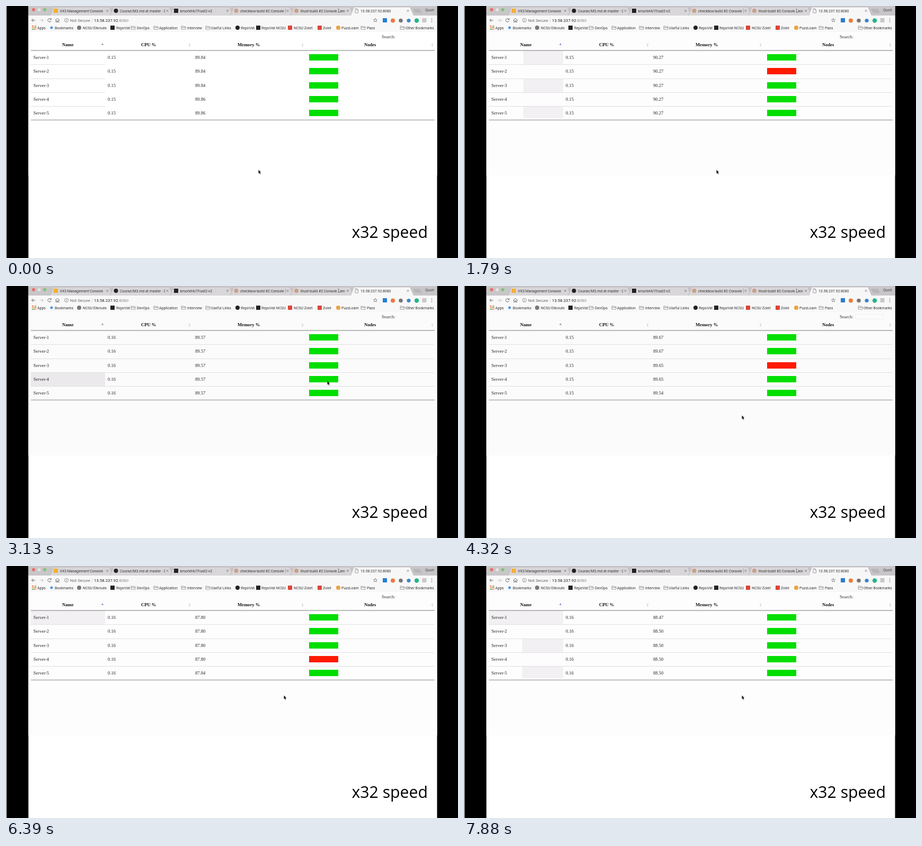
Recreate the animation shown at these times as an HTML page with a canvas. Size 853x476 px, loop 8 s.

```html
<!DOCTYPE html>
<html lang="en">
<head>
<meta charset="utf-8">
<title>Server monitor</title>
<style>
html, body { margin: 0; width: 100%; height: 100%; overflow: hidden; background: #000; }
canvas { display: block; width: 853px; height: 476px; }
</style>
</head>
<body>
<canvas id="stage"></canvas>
<script>
const canvas = document.getElementById('stage');
const ctx = canvas.getContext('2d');
const ratio = window.devicePixelRatio || 1;
canvas.width = 853 * ratio;
canvas.height = 476 * ratio;
ctx.scale(ratio, ratio);

const LOOP = 8000;
const UI = 'Roboto, Arial, sans-serif';
const SERIF = '"Liberation Serif", "Times New Roman", serif';
const LEFT = 42.3, WIDTH = 771.2;
const ROW_TOP = 84, ROW_HEIGHT = 26.25;

// Memory readings per server: time, then the five rows
const memory = [
  [0, 89.84, 89.84, 89.84, 89.86, 89.86],
  [1790, 90.27, 90.27, 90.27, 90.27, 90.27],
  [3130, 89.57, 89.57, 89.57, 89.57, 89.57],
  [4320, 89.67, 89.67, 89.65, 89.65, 89.54],
  [5490, 87.65, 87.65, 87.65, 87.65, 87.65],
  [6390, 87.80, 87.80, 87.80, 87.80, 87.84],
  [7880, 88.47, 88.50, 88.50, 88.50, 88.50]
];
const outages = [
  { row: 1, from: 1490, to: 2380 },
  { row: 2, from: 3870, to: 4900 },
  { row: 3, from: 6240, to: 7140 }
];
// Page tint, row rules and cell shading; shades are [row, left edge, color]
const looks = [
  { from: 0, tint: '#fff', rules: 0, shades: [] },
  { from: 150, tint: '#fdfdfd', rules: 4, blue: true,
    shades: [0, 2, 4].map(row => [row, 112, '#f2f0f2']) },
  { from: 2530, tint: '#fbfbfb', rules: 4, shades: [] },
  { from: 2900, tint: '#fbfbfb', rules: 4, shades: [[3, 47, '#ebe9eb']] },
  { from: 3570, tint: '#fbfbfb', rules: 4, field: true, shades: [] },
  { from: 5040, tint: '#fff', rules: 1, shades: [] },
  { from: 6090, tint: '#fdfdfd', rules: 4, blue: true, shades: [[0, 47, '#f2f0f2']] },
  { from: 7140, tint: '#fdfdfd', rules: 4, blue: true,
    shades: [[0, 47, '#f2f0f2'], [2, 110, '#f2f0f2'], [4, 110, '#f2f0f2']] }
];
const pointerPath = [[2530, 476.5, 309.5], [2980, 606.5, 179.5], [3180, 606.5, 179.5], [3570, 524.5, 244.5]];

function rect(x, y, w, h, color) {
  ctx.fillStyle = color;
  ctx.fillRect(x, y, w, h);
}
function disc(x, y, r, color) {
  ctx.fillStyle = color;
  ctx.beginPath();
  ctx.arc(x, y, r, 0, 7);
  ctx.fill();
}
function shape(points, color) {
  ctx.fillStyle = color;
  ctx.beginPath();
  points.forEach(([x, y]) => ctx.lineTo(x, y));
  ctx.closePath();
  ctx.fill();
}
function stroke(path, color, width = 0.9) {
  ctx.strokeStyle = color;
  ctx.lineWidth = width;
  ctx.stroke(new Path2D(path));
}
function text(str, x, y, size = 7, color = '#444', font = UI, weight = '') {
  ctx.font = `${weight} ${size}px ${font}`;
  ctx.fillStyle = color;
  ctx.fillText(str, x, y);
}
function star(x, y, color, filled) {
  const path = new Path2D();
  for (let i = 0; i < 10; i++) {
    const r = i % 2 ? 1.6 : 3.8, a = i * Math.PI / 5 - Math.PI / 2;
    path.lineTo(x + r * Math.cos(a), y + r * Math.sin(a));
  }
  path.closePath();
  ctx.fillStyle = ctx.strokeStyle = color;
  ctx.lineWidth = 0.7;
  filled ? ctx.fill(path) : ctx.stroke(path);
}

const icons = {
  folder(x, y) {
    stroke(`M${x - 4} ${y + 3}v-6h3l1 1h4v5zm0-3.5h8`, '#888', 0.8);
  },
  grid(x, y) {
    const colors = ['#e2574c', '#e9a13b', '#58a55c'];
    for (let i = 0; i < 9; i++)
      rect(x - 4 + i % 3 * 3, y - 4 + Math.floor(i / 3) * 3, 2, 2, colors[(i + Math.floor(i / 3)) % 3]);
  },
  star(x, y) { star(x, y, '#2c83dd', true); },
  page(x, y) { stroke(`M${x - 2.5} ${y - 4}h3l2.5 2.5v5.5h-5.5zm3 0v2.5h2.5`, '#777', 0.7); },
  square(x, y, color) { rect(x - 4, y - 4, 8, 8, color); },
  circle(x, y, color) { disc(x, y, 4, color); }
};

const tabs = [
  ['square', '#f2b134', 'VX3 Management Console'],
  ['circle', '#222', 'Course/M3.md at master · C'],
  ['square', '#222', 'kmorlet4/iTrust2-v2'],
  ['circle', '#c9a08a', 'checkbox-build #2 Console [Jen'],
  ['circle', '#c9a08a', 'itrust-build #2 Console [Jen'],
  ['page', '', '13.58.237.92:8080']
];
const bookmarks = [
  [53, 'grid', '', 59, 'Apps'], [86, 'star', '', 92, 'Bookmarks'],
  [138, 'circle', '#777', 145, 'NCSU Elkroute'], [201, 'square', '#222', 208, 'RepoVat'],
  [240, 'folder', '', 247, 'DevOps'], [283, 'folder', '', 289, 'Application'],
  [335, 'folder', '', 342, 'Interview'], [381, 'folder', '', 387, 'Useful Links'],
  [437, 'circle', '#222', 443, 'RepoVat'], [476, 'square', '#222', 482, 'RepoVat NCSU'],
  [536, 'square', '#db4437', 543, 'NCSU Zolet'], [592, 'square', '#db4437', 598, 'Zolet'],
  [627, 'circle', '#e8a33d', 633, 'PuzzLoam'], [674, 'folder', '', 681, 'Pass'],
  [748, 'folder', '', 754, 'Other Bookmarks']
];

function drawTabs() {
  rect(LEFT, 0, WIDTH, 18, '#c8c6c8');
  [[52, '#e5706b'], [62.5, '#e4e2e4'], [73, '#7cc67a']].forEach(([x, color]) => disc(x, 7, 3.1, color));
  tabs.forEach(([icon, color, title], i) => {
    const x = 83 + i * 113.5, active = i === 5;
    shape([[x, 18], [x + 6, 2], [x + 112, 2], [x + 119, 18]], active ? '#f7f7f7' : '#d8d6d8');
    stroke(`M${x} 18L${x + 6} 2H${x + 112}L${x + 119} 18`, '#aaa8aa', 0.6);
    icons[icon](x + 11, 9, color);
    ctx.save();
    ctx.beginPath();
    ctx.rect(x + 17, 0, 87, 18);
    ctx.clip();
    text(title, x + 18.5, 11.6, 6.9, '#333');
    ctx.restore();
    stroke(`M${x + 106} 7l4 4m0-4l-4 4`, '#666', 0.7);
  });
  shape([[768, 5.5], [781, 5.5], [785, 13], [772, 13]], '#b8b6b8');
  text('Quorl', 791, 10, 7, '#444');
}

function drawToolbar() {
  rect(LEFT, 18, WIDTH, 31, '#f8f8f8');
  stroke('M55.5 27h-7m3-3l-3 3 3 3', '#555');
  stroke('M63.5 27h7m-3-3l3 3-3 3', '#bbb');
  stroke('M84.5 24.8a3.2 3.2 0 1 0 .6 3.2M85.3 23.2v2.4h-2.4', '#555');
  stroke('M93 27l4-3.7 4 3.7m-6.8-.8v4.2h2v-2.5h1.6v2.5h2v-4.2', '#555', 0.8);
  stroke('M117.5 27a3.5 3.5 0 1 1-7 0a3.5 3.5 0 1 1 7 0M114 25v.8m0 .8v2.4', '#666', 0.7);
  text('Not Secure', 121, 29.7, 7.7, '#666');
  rect(162.3, 23.5, 0.6, 7, '#bbb');
  text('13.58.237.92', 166, 29.7, 7.8, '#222');
  const hostWidth = ctx.measureText('13.58.237.92').width;
  text(':8080', 166 + hostWidth, 29.7, 7.8, '#888');
  star(697, 27, '#666');
  rect(711, 23, 8, 8, '#2a7bd0');
  disc(730, 27.5, 4, '#ee7a3c');
  disc(745, 27.5, 3.8, '#777');
  disc(760, 27.5, 3.6, '#3c82cf');
  disc(775, 27.5, 4.2, '#25b587');
  rect(785.5, 23, 8, 8, '#c9c7c9');
  [24, 27, 30].forEach(y => disc(803.5, y, 0.8, '#666'));
  bookmarks.forEach(([iconX, icon, color, x, label]) => {
    icons[icon](iconX, 41, color);
    text(label, x, 43.6, 6.95, '#333');
  });
}

function drawHeader(look) {
  const heading = (label, x) => text(label, x, 76, 8.6, '#111', SERIF, 'bold');
  text('Search:', 709, 61, 8.6, '#333', SERIF);
  if (look.field) stroke('M738.5 63V53.5H791.5V62.5H738.5', '#eee', 0.7);
  heading('Name', 106);
  heading('CPU %', 255);
  heading('Memory %', 437);
  heading('Nodes', 676);
  shape([[179.8, 73.5], [182, 70.5], [184.2, 73.5]], look.blue ? '#7476c8' : '#888');
  [346.5, 559.5, 804.5].forEach(x => {
    shape([[x - 1.8, 73], [x, 70.5], [x + 1.8, 73]], '#ccc');
    shape([[x - 1.8, 74.5], [x, 77], [x + 1.8, 74.5]], '#ccc');
  });
}

// Readings refresh in four steps between the known samples
function reading(row, t) {
  const next = memory.findIndex(sample => sample[0] > t);
  if (next < 0) return memory[memory.length - 1][row + 1];
  const a = memory[next - 1], b = memory[next];
  const progress = Math.floor(4 * (t - a[0]) / (b[0] - a[0])) / 4;
  return a[row + 1] + (b[row + 1] - a[row + 1]) * progress;
}

function drawTable(t, look) {
  const cpu = (t >= 2380 && t < 3870) || t >= 4900 ? '0.16' : '0.15';
  look.shades.forEach(([row, x, color]) =>
    rect(x, ROW_TOP + row * ROW_HEIGHT + 0.5, 187 - x, ROW_HEIGHT - 4 * (row === 4), color));
  for (let row = 0; row < 5; row++) {
    const top = ROW_TOP + row * ROW_HEIGHT, base = top + 16;
    const down = outages.some(o => o.row === row && t >= o.from && t < o.to);
    text('Server-' + (row + 1), 51.7, base, 8.6, '#222', SERIF);
    text(cpu, 192, base, 8.6, '#222', SERIF);
    text(reading(row, t).toFixed(2), 357, base, 8.6, '#222', SERIF);
    rect(572, Math.round(top + 7), 55, 12, down ? '#ff1a00' : '#00de00');
    if (row < 4) rect(47, Math.round(top + ROW_HEIGHT), (row < look.rules ? 808 : 187) - 47, 1, '#e0e0e0');
  }
  rect(47, 83.5, 762, 1, '#777');
  rect(47, 214.8, 762, 1, '#888');
}

function drawPointer(t) {
  let [, x, y] = pointerPath[0];
  for (let i = 1; i < pointerPath.length; i++) {
    const [t0, x0, y0] = pointerPath[i - 1], [t1, x1, y1] = pointerPath[i];
    if (t < t0) break;
    const p = Math.min(1, (t - t0) / (t1 - t0)), ease = p * p * (3 - 2 * p);
    x = x0 + (x1 - x0) * ease;
    y = y0 + (y1 - y0) * ease;
  }
  const arrow = [[0, 0], [0, 7], [1.6, 5.5], [2.8, 8.2], [3.9, 7.7], [2.8, 5], [4.7, 4.8]];
  shape(arrow.map(([dx, dy]) => [x + dx, y + dy]), '#111');
}

function draw(t) {
  const look = looks.filter(entry => entry.from <= t).pop();
  rect(0, 0, 853, 476, '#000');
  rect(0, 0, 1, 476, '#fff');
  rect(LEFT, 0, WIDTH, 476, '#fff');
  rect(LEFT, 49, WIDTH, 271, look.tint);
  drawTabs();
  drawToolbar();
  drawHeader(look);
  drawTable(t, look);
  drawPointer(t);
  text('x32 speed', 652.5, 437.6, 30.2, '#000', '"Open Sans", "Noto Sans", sans-serif');
}

const start = performance.now();
function tick() {
  draw((performance.now() - start) % LOOP);
  requestAnimationFrame(tick);
}
tick();
</script>
</body>
</html>
```
